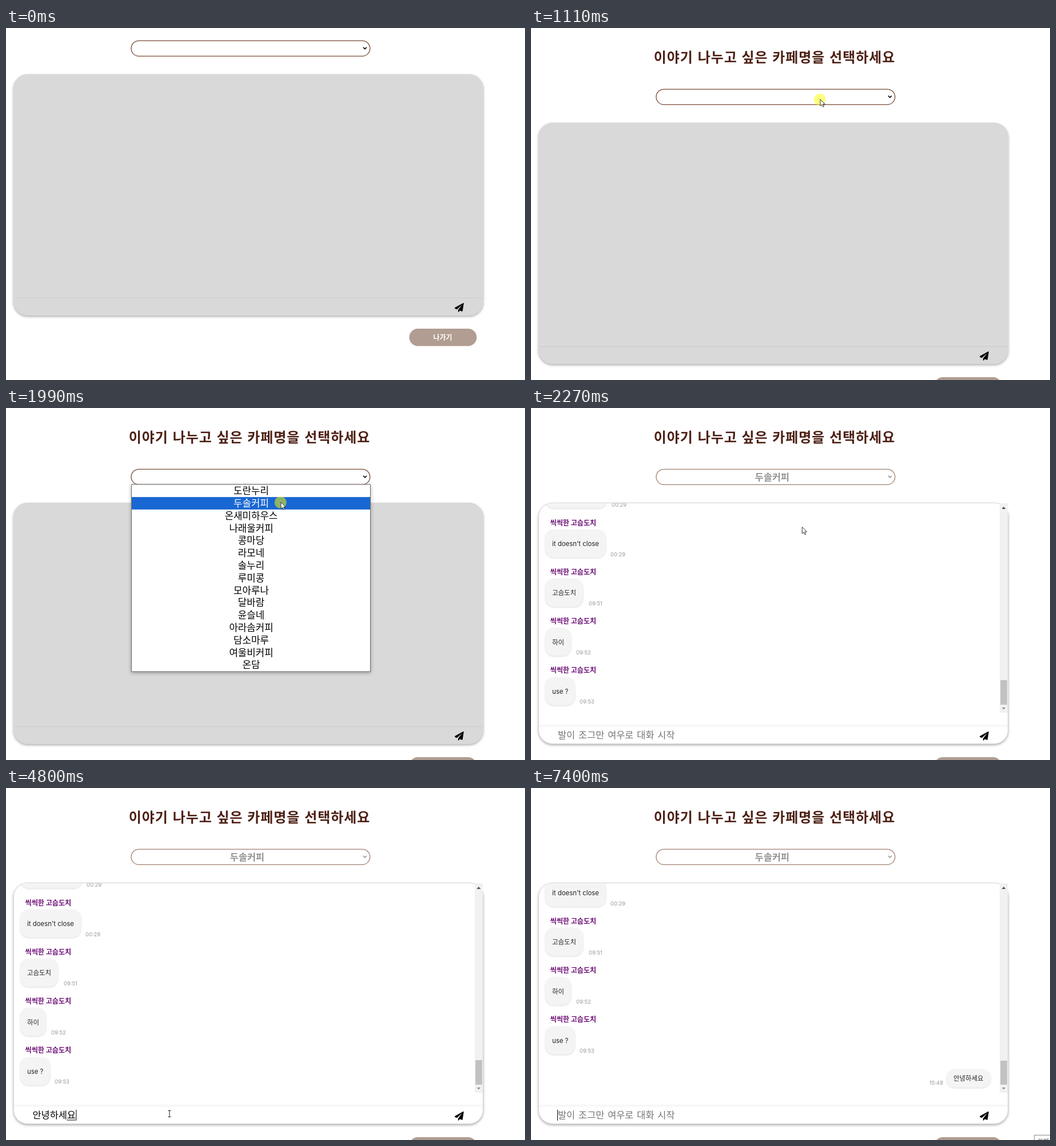
An HTML page that plays this animation: 908 px wide and 617 px high, repeating every 7.47 s.

```html
<!DOCTYPE html>
<html lang="ko">
<head>
<meta charset="utf-8">
<style>
html, body { margin: 0; width: 100%; height: 100%; overflow: hidden; background: #fff; }
svg { display: block; width: 908px; height: 617px; }
text { font-family: "Noto Sans CJK KR", "Noto Sans CJK JP", "Noto Sans CJK", sans-serif; }
.mid { text-anchor: middle; }
.chat text { font-family: Inter, "Noto Sans CJK KR", "Noto Sans CJK JP", "Noto Sans CJK", sans-serif; font-size: 11.4px; fill: #222; }
.chat .name { font-size: 12.1px; font-weight: 700; fill: #6d0e76; }
.chat .time { font-size: 9.4px; fill: #999; }
.chat rect { fill: #f4f4f4; filter: drop-shadow(0 1px 1.5px rgba(0,0,0,.14)); }
.field { font-size: 16.4px; }
#panel { filter: drop-shadow(0 2px 2px rgba(0,0,0,.32)); }
#menu .box { filter: drop-shadow(0 2px 3px rgba(0,0,0,.3)); }
</style>
</head>
<body>
<svg viewBox="0 0 908 617">
  <defs>
    <clipPath id="clip"><rect x="14" y="166.5" width="806" height="368"/></clipPath>
    <clipPath id="round"><rect x="13.5" y="166.5" width="821" height="422" rx="24"/></clipPath>
    <linearGradient id="fade" x2="0" y2="1">
      <stop stop-opacity=".05"/><stop offset="1" stop-opacity="0"/>
    </linearGradient>
  </defs>
  <g id="page">
    <text class="mid" x="426" y="60" font-size="24" font-weight="700" fill="#4d2014" letter-spacing=".92" word-spacing=".2">이야기 나누고 싶은 카페명을 선택하세요</text>

    <g id="select">
      <rect x="219" y="107.3" width="417.8" height="27" rx="13.5" fill="#fff" stroke="#7a4d38" stroke-width="1.3"/>
      <path id="chevron" d="M625 118.8l3 3 3-3" fill="none" stroke="#000" stroke-width="1.6"/>
    </g>
    <text id="choice" class="mid" x="422" y="127" font-size="16.4" font-weight="700" fill="#939393"></text>

    <rect id="panel" x="13.5" y="166.5" width="821" height="422" rx="24" stroke="#d9d9d9"/>
    <g id="room">
      <g clip-path="url(#clip)"><g clip-path="url(#round)"><g id="list" class="chat"></g></g></g>
      <rect x="820" y="167" width="14" height="367" fill="#f1f1f1"/>
      <path d="M823.5 177h7l-3.5-4z" fill="#505050"/>
      <path d="M824 525h6l-3 3.5z" fill="#8a8a8a"/>
      <rect id="thumb" x="821.3" width="11.7" fill="#c1c1c1"/>
    </g>
    <rect x="14" y="555" width="820" height="6" fill="url(#fade)"/>
    <rect x="14" y="555" width="820" height="1" fill="#fff" opacity=".4"/>
    <text id="hint" class="field" x="47" y="579" fill="#757575" word-spacing="1.3">발이 조그만 여우로 대화 시작</text>
    <text id="typed" class="field" x="46.5" y="579"></text>
    <rect id="under" y="581.5" width="15" height="1"/>
    <rect id="caret" y="564" width="1" height="19"/>
    <path transform="translate(785 567)" d="M15.8 1L13.8 14Q13.6 15 12.5 14.7L8.8 13.2 7.2 15.5Q6 16.4 6 15.2V12.2L13 3 3.8 11.2.6 9.9Q-.5 9.1.5 8.1L14.5.2Q16-.2 15.8 1Z"/>

    <rect x="705.5" y="612" width="118" height="30.5" rx="15.2" fill="#b19d91"/>
    <text class="mid" x="764" y="631.5" font-size="12" font-weight="700" fill="#fff">나가기</text>
    <g id="menu">
      <rect class="box" x="219.5" y="134" width="418" height="328" fill="#fff" stroke="#6b6b6b"/>
      <rect id="hover" x="220" width="417" height="21.8" fill="#1967d2"/>
    </g>
  </g>
  <g id="tip">
    <rect x="880.5" y="608.5" width="40" height="20" fill="#fff" stroke="#8a8a8a"/>
    <text x="886" y="624" font-size="11" fill="#555">카페</text>
  </g>
  <g id="mouse">
    <circle id="press" cx="-.7" cy=".5" r="10.5" fill="#ff0" fill-opacity=".5"/>
    <path id="arrow" d="M0 0V11.6L2.7 9.1 4.6 13.3 6.5 12.5 4.6 8.4H8.2Z" fill="#fff" stroke="#222" stroke-width=".9"/>
    <path id="beam" d="M-2.5-5.5H2.5M0-5.5V5.5M-2.5 5.5H2.5" fill="none" stroke="#222"/>
  </g>
</svg>
<script>
const LOOP = 7470, CHOSEN = 2060, SENT = 5930, ROW = 21.8;
const $ = id => document.getElementById(id);
const show = (id, on) => $(id).style.display = on ? '' : 'none';
const within = (t, ...spans) => spans.some(([a, b]) => t >= a && t < b);

const cafes = ['도란누리', '두솔커피', '온새미하우스', '나래울커피', '콩마당', '라모네', '솔누리', '루미콩',
  '모아루나', '달바람', '윤슬네', '아라솜커피', '담소마루', '여울비커피', '온담'];
$('menu').innerHTML += cafes.map((name, i) =>
  `<text class="mid" x="429" y="${151.2 + ROW * i}" font-size="16.8">${name}</text>`).join('');
const items = $('menu').querySelectorAll('text');

// text, bubble width, time, time x
const talk = [['', 108, '00:29', 141], ["it doesn't close", 106, '00:29', 139], ['고슴도치', 66, '09:51', 101],
  ['하이', 45, '09:52', 79], ['use ?', 52, '09:53', 85]];
$('list').innerHTML = talk.map(([text, w, time, x], i) => `<g transform="translate(0 ${86.3 * (i - 1)})">
  <text class="name" x="33.5" y="205.5">씩씩한 고슴도치</text>
  <rect x="25" y="213" width="${w}" height="49" rx="15"/>
  <text x="37" y="242">${text}</text><text class="time" x="${x}" y="259.6">${time}</text></g>`).join('') +
  `<g id="reply"><rect x="727" y="547" width="77" height="32" rx="15"/>
  <text x="739" y="566.5">안녕하세요</text><text class="time" x="697" y="573.6">15:48</text></g>`;

const typing = [[3900, 'ㅇ'], [3970, '안'],
  ...['안ㄴ', '안녀', '안녕', '안녕ㅎ', '안녕하', '안녕핫', '안녕하세', '안녕하셍', '안녕하세요'].map((s, i) => [4120 + 85 * i, s])];
const scroll = [[130, -85], [410, -41.5], [480, -41.5], [690, 0]];
const path = [[130, 504, 289], [620, 504, 289], [820, 506, 125], [1440, 506, 125], [1990, 481, 165], [2060, 481, 165],
  [2130, 493, 174], [2890, 287, 556], [2960, 286, 566], [3040, 286, 571], [5330, 286, 571], [5400, 752, 518],
  [5860, 752, 518], [6270, 885, 545]];

// Eased value list at time t
function along(keys, t) {
  const i = keys.findIndex(k => k[0] > t);
  if (i < 1) return keys.at(i).slice(1);
  const [a, ...from] = keys[i - 1], [b, ...to] = keys[i];
  const u = (t - a) / (b - a), e = u * u * (3 - 2 * u);
  return from.map((v, j) => v + (to[j] - v) * e);
}

function draw(t) {
  const chosen = t >= CHOSEN, sent = t >= SENT;
  const [x, y] = along(path, t);
  $('page').setAttribute('transform', `translate(0 ${along(scroll, t)[0]})`);

  const open = within(t, [1180, CHOSEN]), row = Math.floor((y - 134.3) / ROW);
  show('menu', open);
  show('hover', row >= 0);
  $('hover').setAttribute('y', 134.3 + ROW * Math.max(row, 0));
  items.forEach((item, i) => item.setAttribute('fill', i === row ? '#fff' : '#000'));

  $('select').style.opacity = chosen ? .7 : 1;
  $('chevron').style.opacity = chosen ? .6 : 1;
  $('choice').textContent = chosen ? cafes[1] : '';
  $('panel').setAttribute('fill', chosen ? '#fff' : '#d9d9d9');
  show('room', chosen);
  show('reply', sent);
  $('list').setAttribute('transform', `translate(0 ${sent ? -54 : 0})`);
  $('thumb').setAttribute('y', sent ? 478 : 477);
  $('thumb').setAttribute('height', sent ? 42 : 43);

  const word = sent ? '' : (typing.findLast(k => k[0] <= t) || [0, ''])[1];
  const end = 46 + 15.1 * word.length;
  $('typed').textContent = word;
  show('hint', chosen && !word);
  show('under', word);
  $('under').setAttribute('x', end - 15);
  show('caret', within(t, [3040, 3570], [3900, 5330], [5860, 6470], [7000, LOOP]));
  $('caret').setAttribute('x', end + (word ? .8 : 0));

  const beam = within(t, [2925, 5330]);
  show('mouse', within(t, [130, 6270]));
  $('mouse').setAttribute('transform', `translate(${x} ${y})`);
  show('arrow', !beam);
  show('beam', beam);
  show('press', within(t, [1040, 1180], [1990, CHOSEN], [3040, 3370]));
  show('tip', t >= 7400);
}

const start = performance.now();
function frame() {
  draw((performance.now() - start) % LOOP);
  requestAnimationFrame(frame);
}
frame();
</script>
</body>
</html>
```
